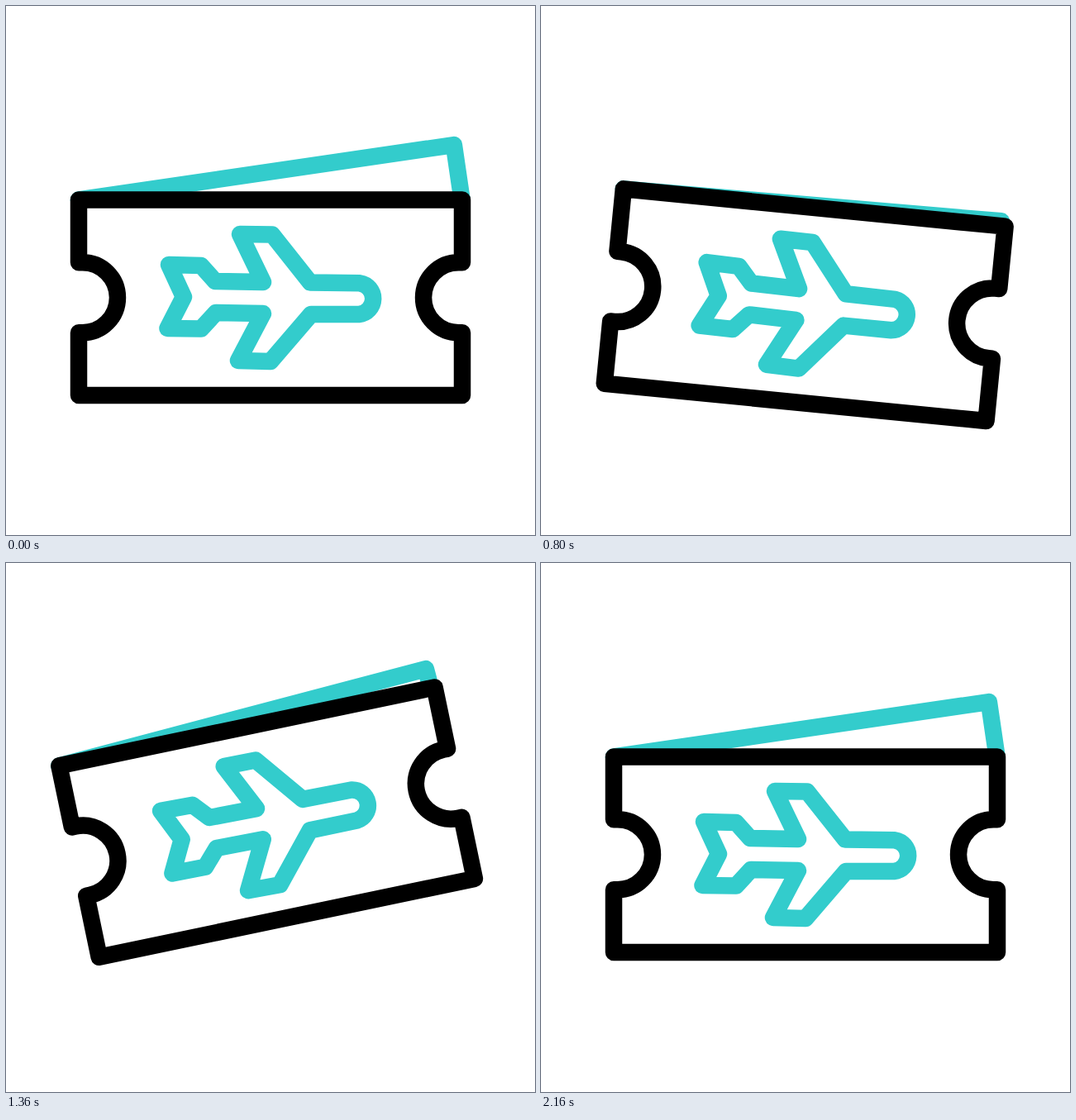
Recreate the animation shown at these times as an HTML page. Size 640x640 px, loop 2560 ms.

```html
<!DOCTYPE html>
<html lang="en">
<head>
<meta charset="utf-8">
<title>Flight tickets</title>
<style>
  html, body { margin: 0; width: 100%; height: 100%; overflow: hidden; background: #fff; }
  svg { display: block; width: 100vw; height: 100vh; }
  .line { fill: none; stroke-width: 20.5; stroke-linecap: round; stroke-linejoin: round; }
  .teal { stroke: #3cc; }
  .black { stroke: #000; }
</style>
</head>
<body>
<svg viewBox="0 0 640 640">
  <defs>
    <path id="outline" d="M88 234.5H552V310.3h-4.5a42.5 42.5 0 0 0 0 85h4.5V471H88V395.3h4.5a42.5 42.5 0 0 0 0-85H88Z"/>
    <clipPath id="inside"><use href="#outline"/></clipPath>
  </defs>
  <g id="ticket">
    <path id="back" class="line teal" d="M88 234.5h458.7v66"/>
    <use href="#outline" fill="#fff"/>
    <path class="line teal" d="M368 334.5L322 276.5L283 276L311 334L253 333L236 314L197 313L215 352L195.5 390L236 390.5L254 371L311 372L281 429L320 430L369 373H427A19 19 0 0 0 428 335.3Z"/>
    <g clip-path="url(#inside)">
      <path id="shine" class="line teal" d="M-200 200L-500 500"/>
    </g>
    <use href="#outline" class="line black"/>
  </g>
</svg>
<script>
const LOOP = 2560, STEP = 40;

// Keys are [time in ms, value].
const tilt = curve([[440, 0], [520, 0.25], [640, 2.5], [800, 5.6], [1040, -2.7], [1200, -15],
  [1220, -15.2], [1360, -11.8], [1560, 0.7], [1660, 2], [1760, 0.7], [1820, 0]]);
const lift = curve([[480, 0], [520, -0.4], [640, -6.5], [800, -10], [1040, 7.8], [1200, 9.5],
  [1360, 0.5], [1560, 0.5], [1660, 0]]);
const fan = curve([[80, -8.33], [960, 0], [1220, 0], [1360, -3], [1560, -7.6], [1820, -8.33]]);
const sweep = curve([[1800, 1050], [2160, 315]], true);

// Smooth curve through the keys that never overshoots them.
function curve(keys, linear) {
  const slope = i => (keys[i + 1][1] - keys[i][1]) / (keys[i + 1][0] - keys[i][0]);
  const tangent = i => {
    if (i === 0 || i === keys.length - 1) return linear ? slope(0) : 0;
    const a = slope(i - 1), b = slope(i);
    return a * b <= 0 ? 0 : 2 * a * b / (a + b);
  };
  return t => {
    const last = keys.length - 1;
    if (t <= keys[0][0]) return keys[0][1];
    if (t >= keys[last][0]) return keys[last][1];
    const i = keys.findIndex(k => k[0] > t) - 1;
    const [t0, v0] = keys[i], [t1, v1] = keys[i + 1];
    const d = t1 - t0, u = (t - t0) / d, w = 1 - u;
    return v0 * w * w * (1 + 2 * u) + v1 * u * u * (3 - 2 * u)
      + d * u * w * (w * tangent(i) - u * tangent(i + 1));
  };
}

const [ticket, back, shine] = ["ticket", "back", "shine"].map(id => document.getElementById(id));

function draw(time) {
  // The motion advances in steps of 40 ms.
  const t = Math.floor((time + 2) / STEP) * STEP % LOOP;
  ticket.setAttribute("transform", `translate(0 ${lift(t)}) rotate(${tilt(t)} 126 354)`);
  back.setAttribute("transform", `rotate(${fan(t)} 88 234.5)`);
  shine.setAttribute("transform", `translate(${sweep(t)} 0)`);
}

const start = performance.now();
function tick(now) {
  draw(Math.max(0, now - start));
  requestAnimationFrame(tick);
}
draw(0);
requestAnimationFrame(tick);
</script>
</body>
</html>
```
